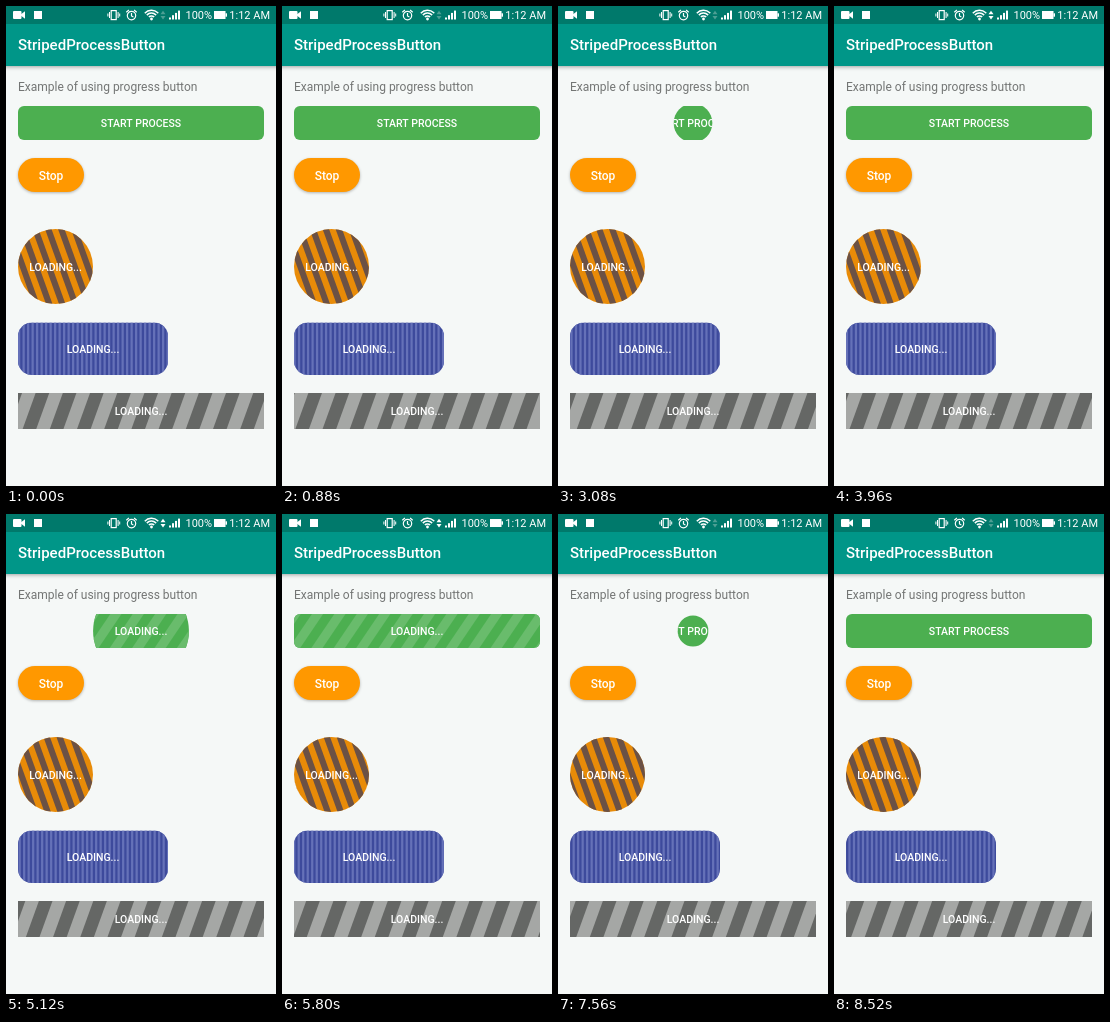
These frames come from a looping animation (270x480 px, 8.56 s). An HTML page with a canvas:

```html
<!DOCTYPE html>
<html lang="en">
<head>
<meta charset="utf-8">
<title>StripedProcessButton</title>
<style>
html, body { margin: 0; width: 100%; height: 100%; overflow: hidden; background: #f5f8f7; }
canvas { display: block; width: 270px; height: 480px; }
</style>
</head>
<body>
<canvas id="stage" width="270" height="480"></canvas>
<script>
const LOOP = 8560;
const REVEAL = 1000;
const STRIPE_TIME = 1000;
const c = document.getElementById('stage').getContext('2d');

// Taps that swap the green button between idle and loading
const taps = [
  { at: 1160, loading: true },
  { at: 2900, loading: false },
  { at: 4830, loading: true },
  { at: 7400, loading: false }
];
// Spans with network traffic
const traffic = [[1900, 2500], [3640, 4320], [4700, 6900]];

const green = { x: 12, y: 100, w: 246, h: 34, r: 6, base: '#4caf50', band: '#69bc6c', period: 22.4, slant: 23, dir: 1, shift: 0 };
const round = { x: 12, y: 223, w: 75, h: 75, r: 37.5, base: '#e88b08', band: '#6b5145', period: 13, slant: -27, dir: -1, shift: 3 };
const blue = { x: 12, y: 316.5, w: 150, h: 52.5, r: 14, base: '#3d4a9c', band: '#6571b8', period: 4.5, slant: 0, dir: 1, shift: 0 };
const grey = { x: 12, y: 387, w: 246, h: 36, r: 0, base: '#656765', band: '#a5a7a5', period: 27.2, slant: 13, dir: 1, shift: 4 };

function text(s, x, y, size, color, weight = 400, align = 'left') {
  c.font = `${weight} ${size}px Roboto, sans-serif`;
  c.fillStyle = color;
  c.textAlign = align;
  c.fillText(s, x, y);
}

function box(b) {
  c.beginPath();
  c.roundRect(b.x, b.y, b.w, b.h, b.r);
}

function poly(color, ...p) {
  c.fillStyle = color;
  c.beginPath();
  for (let i = 0; i < p.length; i += 2) c.lineTo(p[i], p[i + 1]);
  c.fill();
}

function label(b, s) {
  text(s, b.x + b.w / 2, b.y + b.h / 2 + 4, 10.5, '#fff', 500, 'center');
}

function striped(b, t) {
  c.save();
  box(b);
  c.clip();
  c.fillStyle = b.base;
  c.fillRect(b.x, b.y, b.w, b.h);
  const move = (b.shift + b.dir * t / STRIPE_TIME * b.period) % b.period;
  const lean = Math.abs(b.slant) + b.period * 2;
  const bottom = b.y + b.h;
  for (let x = b.x - lean + move; x < b.x + b.w + lean; x += b.period) {
    const w = b.period / 2;
    poly(b.band, x, bottom, x + w, bottom, x + w + b.slant, b.y, x + b.slant, b.y);
  }
  c.restore();
  label(b, 'LOADING...');
}

function greenButton(t) {
  const tap = taps.filter(p => p.at <= t).pop();
  c.save();
  if (tap && t - tap.at < REVEAL) {
    const k = (1 - Math.cos(Math.PI * (t - tap.at) / REVEAL)) / 2;
    c.beginPath();
    c.arc(135, 117, k * green.w, 0, Math.PI * 2);
    c.clip();
  }
  if (tap && tap.loading) {
    striped(green, t);
  } else {
    box(green);
    c.fillStyle = green.base;
    c.fill();
    label(green, 'START PROCESS');
  }
  c.restore();
}

function shadow(color, blur, dy) {
  c.shadowColor = color;
  c.shadowBlur = blur;
  c.shadowOffsetY = dy;
}

function statusBar(t) {
  c.fillStyle = '#00796b';
  c.fillRect(0, 0, 270, 18);
  const w = '#fff';

  // Camera and notification
  c.fillStyle = w;
  c.beginPath();
  c.roundRect(7, 5, 8.5, 8, 1);
  c.fill();
  poly(w, 15, 8.3, 19, 5.3, 19, 12.7, 15, 9.7);
  c.fillRect(28, 5, 8, 8);

  // Vibrate
  c.strokeStyle = w;
  c.lineWidth = 1.2;
  c.strokeRect(105.2, 4.6, 5, 9);
  c.fillRect(103, 6, 1, 6);
  c.fillRect(101.4, 7.5, 1, 3);
  c.fillRect(111.6, 6, 1, 6);
  c.fillRect(113.2, 7.5, 1, 3);

  // Alarm
  c.beginPath();
  c.arc(125.5, 9.6, 4.2, 0, Math.PI * 2);
  c.moveTo(125.5, 7);
  c.lineTo(125.5, 10);
  c.lineTo(127.4, 11);
  c.moveTo(120.3, 6.2);
  c.lineTo(122.9, 4);
  c.moveTo(128.1, 4);
  c.lineTo(130.7, 6.2);
  c.stroke();

  // Wi-Fi
  c.lineWidth = 1.5;
  for (const r of [3.6, 6.4, 9.2]) {
    c.beginPath();
    c.arc(145.5, 13.5, r, -Math.PI * 0.76, -Math.PI * 0.24);
    c.stroke();
  }
  c.beginPath();
  c.arc(145.5, 13, 1.4, 0, Math.PI * 2);
  c.fill();

  // Traffic arrows
  const busy = traffic.some(([a, b]) => t >= a && t < b);
  const arrow = busy ? w : '#4d9f94';
  poly(arrow, 154.5, 8.2, 157, 4.8, 159.5, 8.2);
  poly(arrow, 154.5, 10, 157, 13.4, 159.5, 10);

  // Signal
  for (let i = 0; i < 4; i++) {
    c.fillStyle = w;
    c.fillRect(163 + i * 3, 11.5 - i * 2.3, 2, 2 + i * 2.3);
  }

  text('100%', 179.5, 13, 11, w);
  c.fillStyle = w;
  c.fillRect(208, 5, 11.5, 8);
  c.fillRect(219.5, 7.3, 1.5, 3.4);
  text('1:12 AM', 264, 13, 11, w, 400, 'right');
}

function draw(t) {
  c.fillStyle = '#f5f8f7';
  c.fillRect(0, 0, 270, 480);

  c.save();
  shadow('rgba(0,0,0,.35)', 4, 1);
  c.fillStyle = '#009688';
  c.fillRect(-6, 0, 282, 60);
  c.restore();
  statusBar(t);
  text('StripedProcessButton', 12, 44, 15, '#fff', 500);
  text('Example of using progress button', 12, 85, 12, '#737574');

  greenButton(t);

  const stop = { x: 12, y: 152, w: 66, h: 34, r: 17 };
  c.save();
  shadow('rgba(0,0,0,.28)', 3, 1);
  c.fillStyle = '#ff9800';
  box(stop);
  c.fill();
  c.restore();
  text('Stop', 45, 173.5, 12, '#fff', 500, 'center');

  striped(round, t);
  striped(blue, t);
  striped(grey, t);
}

function frame() {
  draw(performance.now() % LOOP);
  requestAnimationFrame(frame);
}
frame();
</script>
</body>
</html>
```
